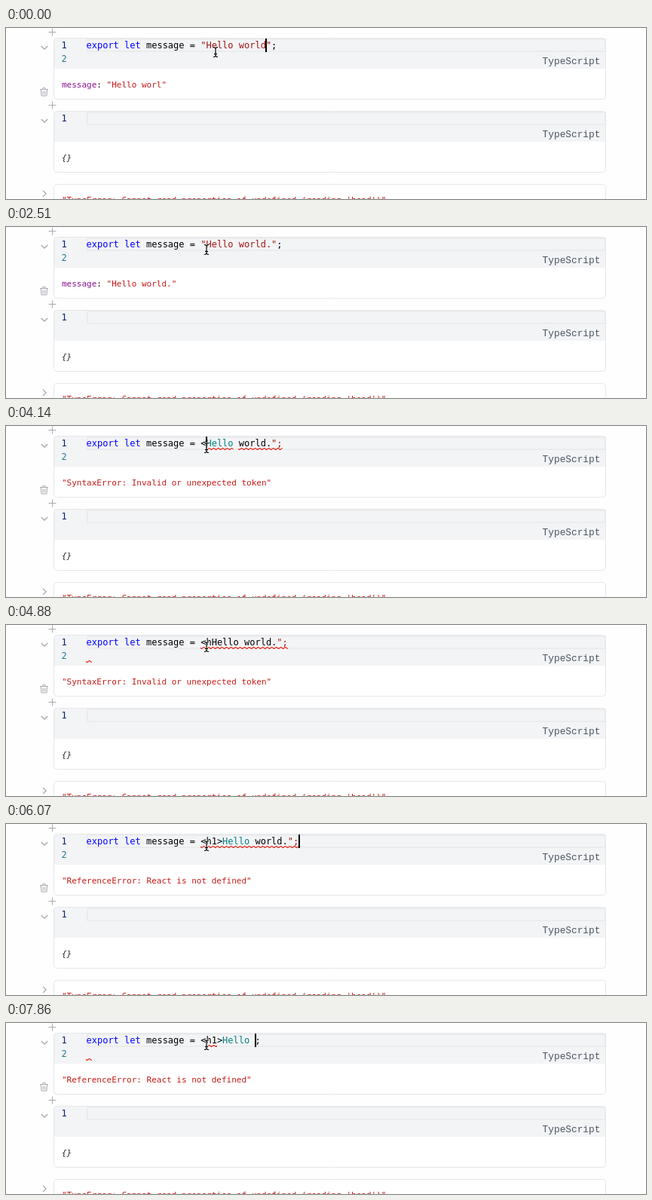
An HTML page with a canvas for the animation above (8 s loop, 849 px wide and 227 px high).

```html
<!DOCTYPE html>
<html lang="en">
<head>
<meta charset="utf-8">
<title>Notebook editing</title>
<style>
html, body { margin: 0; width: 100%; height: 100%; overflow: hidden; background: #fefefe; }
canvas { display: block; }
</style>
</head>
<body>
<canvas id="stage"></canvas>
<script>
const W = 849, H = 227, LOOP = 8000;
const canvas = document.getElementById('stage');
const ctx = canvas.getContext('2d');
const ratio = window.devicePixelRatio || 1;
canvas.width = W * ratio;
canvas.height = H * ratio;
canvas.style.width = W + 'px';
canvas.style.height = H + 'px';

const MONO = '"DejaVu Sans Mono", Menlo, monospace';
const CODE_FONT = '12px ' + MONO;
const OUT_FONT = '11px ' + MONO;
const LABEL_FONT = '12.8px "Liberation Mono", "Courier New", monospace';
const CODE_X = 106.5, COL = 7.224, LINE = 18;
const PREFIX = 'export let message = ';
const SYNTAX = '"SyntaxError: Invalid or unexpected token"';
const REFERENCE = '"ReferenceError: React is not defined"';

const colX = col => CODE_X + col * COL;

// Each step changes only the listed parts of the editor.
// caret and marks are in columns; mark2 is the squiggle on the second line.
const STEPS = [
  { t: 0, code: '"Hello world";', out: 'message: "Hello worl"', caret: 33, on: true,
    marks: [], mark2: false, glow: false, mouse: [278, 32] },
  { t: 150, code: '"Hello world.";', out: 'message: "Hello world."', caret: 34 },
  { t: 590, on: false },
  { t: 1040, on: true },
  { t: 1630, on: false, mouse: [278, 33] },
  { t: 1780, mouse: [276, 40] },
  { t: 1930, mouse: [272, 46] },
  { t: 2070, mouse: [268, 39], on: true },
  { t: 2210, mouse: [266, 32] },
  { t: 2510, mouse: [266, 30], on: false },
  { t: 2660, mouse: [266, 29], caret: 22 },
  { t: 2950, on: true },
  { t: 3250, glow: true },
  { t: 3550, code: 'Hello world.";', caret: 21, glow: false },
  { t: 3690, out: SYNTAX },
  { t: 3990, code: '<Hello world.";', caret: 22 },
  { t: 4140, marks: [[22, 27], [28, 36]] },
  { t: 4440, code: '<hHello world.";', caret: 23, marks: [[22, 28], [29, 37]] },
  { t: 4580, mark2: true },
  { t: 4880, on: false, marks: [[21, 37]] },
  { t: 5180, code: '<h1Hello world.";', caret: 24, on: true, marks: [[21, 38]] },
  { t: 5330, mark2: false },
  { t: 5780, code: '<h1>Hello world.";', caret: 25, marks: [[21, 39]] },
  { t: 5930, out: REFERENCE },
  { t: 6070, caret: 39 },
  { t: 6220, caret: 38 },
  { t: 6370, marks: [[22, 24]], mark2: true },
  { t: 6820, code: '<h1>Hello world.;', caret: 37 },
  { t: 7270, on: false },
  { t: 7570, code: '<h1>Hello .;'.replace('.', 'world'), caret: 36, on: true },
  { t: 7860, code: '<h1>Hello ;', caret: 31 }
];

function stateAt(time) {
  return Object.assign({}, ...STEPS.filter(step => step.t <= time));
}

function text(str, x, y, font, color) {
  ctx.font = font;
  ctx.fillStyle = color;
  ctx.fillText(str, x, y);
}

function box(x, y, w, h, color) {
  ctx.fillStyle = color;
  ctx.fillRect(x, y, w, h);
}

function line(points, color, width = 1) {
  ctx.beginPath();
  points.forEach(([x, y], i) => i ? ctx.lineTo(x, y) : ctx.moveTo(x, y));
  ctx.strokeStyle = color;
  ctx.lineWidth = width;
  ctx.stroke();
}

function tokenColor(token) {
  if (token[0] === '"') return '#a31515';
  if (token === 'export' || token === 'let') return '#0000ff';
  return /^[A-Z]/.test(token) ? '#008080' : '#000';
}

function drawCode(code, y) {
  for (const m of code.matchAll(/"[^"]*"|".*|\w+|[^\w"]+/g))
    text(m[0], colX(m.index), y, CODE_FONT, tokenColor(m[0]));
}

function drawOutput(out, y) {
  const name = (out.match(/^\w+/) || [''])[0];
  const quote = out.indexOf('"');
  const step = 6.622;
  text(name, 74, y, OUT_FONT, '#881391');
  text(out.slice(name.length, quote), 74 + name.length * step, y, OUT_FONT, '#000');
  text(out.slice(quote), 74 + quote * step, y, OUT_FONT, '#c41a16');
}

function squiggle(from, to, bottom) {
  const x0 = Math.floor(colX(from)), x1 = colX(to);
  ctx.save();
  ctx.beginPath();
  ctx.rect(x0, bottom - 3, x1 - x0, 3);
  ctx.clip();
  const points = [];
  for (let x = x0 - 2, low = false; x <= x1 + 3; x += 3, low = !low)
    points.push([x + 0.6, bottom - (low ? 0.5 : 2.6)]);
  line(points, '#e51400', 1.1);
  ctx.restore();
}

function plus(x, y) {
  line([[x - 5, y], [x + 5, y]], '#a5a9b0');
  line([[x, y - 5], [x, y + 5]], '#a5a9b0');
}

function chevronDown(y) {
  line([[46.8, y - 2], [51, y + 2.2], [55.2, y - 2]], '#9ca0a8', 1.1);
}

function trash() {
  const gray = '#a9acb2';
  line([[45, 81.5], [56, 81.5]], gray);
  line([[48.5, 81], [49, 79.5], [52, 79.5], [52.5, 81]], gray);
  line([[46.4, 82], [47, 90], [54, 90], [54.6, 82]], gray);
  for (const x of [48.7, 50.5, 52.3]) line([[x, 83.5], [x, 88.5]], gray, 0.8);
}

function cellFrame(y, h, editor) {
  ctx.beginPath();
  ctx.roundRect(63.5, y + 0.5, 732, h, 4);
  ctx.fillStyle = '#fff';
  ctx.fill();
  if (editor) {
    box(64, y + 1, 731, 40, '#f3f4f6');
    ctx.strokeStyle = '#ebecee';
    ctx.lineWidth = 2;
    ctx.strokeRect(108, y + 2, 687, 16);
    text('TypeScript', 711.6, y + 34.5, LABEL_FONT, '#4b5563');
  }
  ctx.beginPath();
  ctx.roundRect(63.5, y + 0.5, 732, h, 4);
  ctx.strokeStyle = '#e5e7eb';
  ctx.lineWidth = 1;
  ctx.stroke();
}

function iBeam([x, y]) {
  const shape = (color, width) => {
    line([[x - 3, y - 6.5], [x - 1.2, y - 6.2], [x, y - 5], [x, y + 5],
          [x - 1.2, y + 6.2], [x - 3, y + 6.5]], color, width);
    line([[x + 3, y - 6.5], [x + 1.2, y - 6.2], [x, y - 5]], color, width);
    line([[x + 3, y + 6.5], [x + 1.2, y + 6.2], [x, y + 5]], color, width);
    line([[x - 2, y + 2.5], [x + 2, y + 2.5]], color, width);
  };
  shape('rgba(255,255,255,0.75)', 2.8);
  shape('#000', 1.2);
}

function draw(time) {
  const s = stateAt(time);
  ctx.setTransform(ratio, 0, 0, ratio, 0, 0);
  box(0, 0, W, H, '#fefefe');

  cellFrame(13, 81, true);
  cellFrame(110, 81, true);
  cellFrame(207, 60, false);
  plus(61.5, 5.5);
  plus(61.5, 102.5);
  chevronDown(26);
  chevronDown(123);
  line([[49, 215.8], [53.2, 220], [49, 224.2]], '#9ca0a8', 1.1);
  trash();

  text('1', 73.5, 27, CODE_FONT, '#0b216f');
  text('2', 73.5, 45, CODE_FONT, '#237893');
  text('1', 73.5, 124, CODE_FONT, '#0b216f');
  text('{}', 74, 176, 'italic ' + OUT_FONT, '#222');
  drawOutput('"TypeError: Cannot read properties of undefined (reading \'head\')"', 232);

  if (s.glow) box(265, 14, 88, LINE, '#dde5ee');
  drawCode(PREFIX + s.code, 27);
  for (const [from, to] of s.marks) squiggle(from, to, 32);
  if (s.mark2) squiggle(0, 1, 50);
  drawOutput(s.out, 79);
  if (s.on) box(Math.floor(colX(s.caret)), 14, 2, LINE, '#000');
  iBeam(s.mouse);
}

const start = performance.now();
function tick() {
  draw((performance.now() - start) % LOOP);
  requestAnimationFrame(tick);
}
tick();
</script>
</body>
</html>
```
